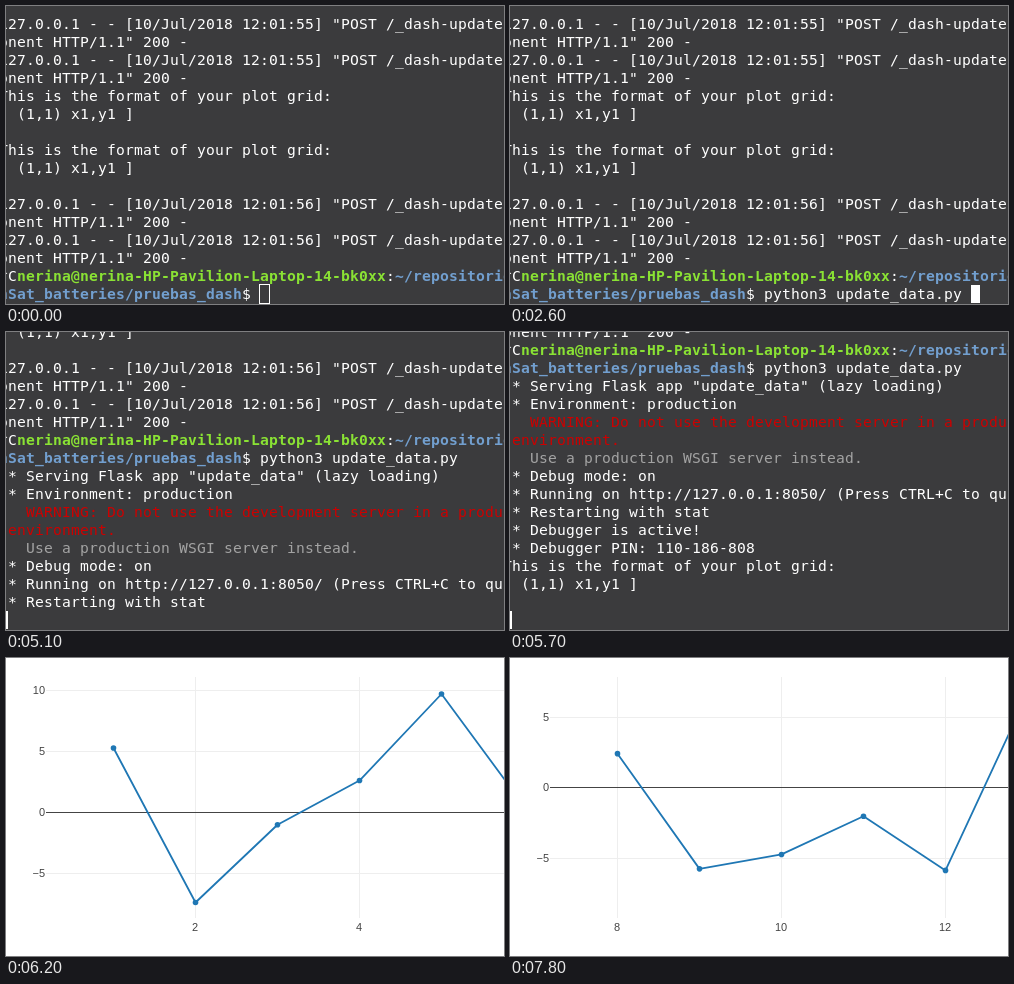
Animation, 498 px wide and 298 px high, one loop 8000 ms. Source, as an HTML page with a canvas:

```html
<!DOCTYPE html>
<html lang="en">
<head>
<meta charset="utf-8">
<title>Terminal and live plot</title>
<style>
html, body { margin: 0; width: 100%; height: 100%; overflow: hidden; }
canvas { display: block; }
</style>
</head>
<body>
<canvas id="stage" width="498" height="298"></canvas>
<script>
const ctx = document.getElementById('stage').getContext('2d');
const W = 498, H = 298, LOOP = 8000;

// Terminal: each line is a list of [text, colour, bold] runs
const CELL_W = 9, CELL_H = 18, LEFT = -7, TOP = 9, LAST_ROW = 15;
const WHITE = '#fff', GREEN = '#8ae234', BLUE = '#729fcf', RED = '#cc0000', DIM = '#a3a3a3';
const line = (text, color = WHITE) => [[text, color]];
const post = time => [
  line(`127.0.0.1 - - [10/Jul/2018 ${time}] "POST /_dash-update-comp`),
  line('onent HTTP/1.1" 200 -')
];
const grid = [line('This is the format of your plot grid:'), line('[ (1,1) x1,y1 ]'), line('')];
const COMMAND = 'python3 update_data.py ';
const PROMPT_COLS = 29;

const lines = [
  ...post('12:01:55'), ...post('12:01:55'), ...grid, ...grid,
  ...post('12:01:56'), ...post('12:01:56'),
  [['^C', WHITE], ['nerina@nerina-HP-Pavilion-Laptop-14-bk0xx', GREEN, true], [':', WHITE],
    ['~/repositorios', BLUE, true]],
  [['nSat_batteries/pruebas_dash', BLUE, true], ['$ ', WHITE]],
  line(' * Serving Flask app "update_data" (lazy loading)'),
  line(' * Environment: production'),
  line('   WARNING: Do not use the development server in a production', RED),
  line(' environment.', RED),
  line('   Use a production WSGI server instead.', DIM),
  line(' * Debug mode: on'),
  line(' * Running on http://127.0.0.1:8050/ (Press CTRL+C to quit)'),
  line(' * Restarting with stat'),
  line(' * Debugger is active!'),
  line(' * Debugger PIN: 110-186-808'),
  ...grid, ...grid, ...post('12:02:20'), ...post('12:02:20')
];

const FOCUS = 500, TYPED = 1600, PLOT = 6200;
const scrolls = [[0, 0], [2900, 1], [4200, 9], [5300, 11], [5700, 14], [5800, 17], [5900, 21]];
const cursorOff = [[1100, 1600], [1900, 2600], [3400, 4000], [4500, 5100], [5800, 6200]];

// Value of the latest [time, value] pair that has started
const stepAt = (steps, t) => steps.filter(([start]) => t >= start).pop()[1];

function drawRun(text, col, row, color, bold) {
  ctx.font = `${bold ? 'bold ' : ''}11pt "DejaVu Sans Mono", monospace`;
  ctx.fillStyle = color;
  [...text].forEach((ch, i) => ctx.fillText(ch, LEFT + (col + i) * CELL_W, TOP + row * CELL_H + 14));
}

function drawCursor(t, col) {
  const x = LEFT + col * CELL_W, y = TOP + LAST_ROW * CELL_H;
  if (t < FOCUS) {
    ctx.strokeStyle = WHITE;
    ctx.lineWidth = 1;
    ctx.strokeRect(x - 0.5, y - 0.5, CELL_W + 1, CELL_H + 1);
  } else if (!cursorOff.some(([from, to]) => t >= from && t < to)) {
    ctx.fillStyle = WHITE;
    ctx.fillRect(x, y, CELL_W, CELL_H);
  }
}

function drawTerminal(t) {
  ctx.fillStyle = '#3b3b3d';
  ctx.fillRect(0, 0, W, H);
  ctx.textAlign = 'left';
  const scroll = stepAt(scrolls, t);
  const count = LAST_ROW + (scroll || 1);
  lines.slice(0, count).forEach((runs, i) => {
    let col = 0;
    for (const [text, color, bold] of runs) {
      drawRun(text, col, i - scroll, color, bold);
      col += text.length;
    }
  });
  const typed = t >= TYPED ? COMMAND : '';
  drawRun(typed, PROMPT_COLS, LAST_ROW - scroll, WHITE);
  drawCursor(t, scroll ? 0 : PROMPT_COLS + typed.length);
}

// Plot: a window of ten samples, the vertical axis fitted to their range
const samples = [5.29, -7.37, -1, 2.62, 9.71, 0.6, -3, 2.41, -5.74, -4.72,
  -2.02, -5.85, 6.63, -8.12, 1.5, 3.2, -2.4];
const windows = [[PLOT, 1], [6700, 4], [7800, 8]];
const SPAN = 10, AXIS = 40, FIRST_X = 107.5, STEP_X = 82;

function drawPlot(t) {
  const first = stepAt(windows, t);
  const shown = samples.slice(first - 1, first - 1 + SPAN);
  const max = Math.max(...shown), min = Math.min(...shown);
  const xOf = n => FIRST_X + (n - first) * STEP_X;
  const yOf = v => 36 + (max - v) * 208.5 / (max - min);
  const rect = (color, x, y, w, h) => {
    ctx.fillStyle = color;
    ctx.fillRect(Math.floor(x), Math.floor(y), w, h);
  };
  const label = (text, x, y, align) => {
    ctx.fillStyle = '#444';
    ctx.textAlign = align;
    ctx.fillText(text, x, y);
  };

  rect('#fff', 0, 0, W, H);
  ctx.font = '11px "Liberation Sans", Arial, sans-serif';
  for (let n = first + first % 2; xOf(n) < W; n += 2) {
    rect('#eee', xOf(n), 19, 1, 241);
    label(n, xOf(n) - 0.5, 273, 'center');
  }
  for (let v = -5; v <= max + 1; v += 5) {
    if (v) rect('#eee', AXIS, yOf(v), W, 1);
    label(String(v).replace('-', '\u2212'), 39, Math.floor(yOf(v)) + 4, 'right');
  }
  rect('#444', AXIS, yOf(0), W, 1);

  ctx.strokeStyle = ctx.fillStyle = '#1f77b4';
  ctx.lineWidth = 1.8;
  ctx.lineJoin = 'round';
  ctx.beginPath();
  shown.forEach((v, i) => ctx.lineTo(xOf(first + i), yOf(v)));
  ctx.stroke();
  shown.forEach((v, i) => {
    ctx.beginPath();
    ctx.arc(xOf(first + i), yOf(v), 2.8, 0, Math.PI * 2);
    ctx.fill();
  });
}

const startTime = performance.now();
function draw() {
  const t = (performance.now() - startTime) % LOOP;
  (t < PLOT ? drawTerminal : drawPlot)(t);
  requestAnimationFrame(draw);
}
draw();
</script>
</body>
</html>
```
